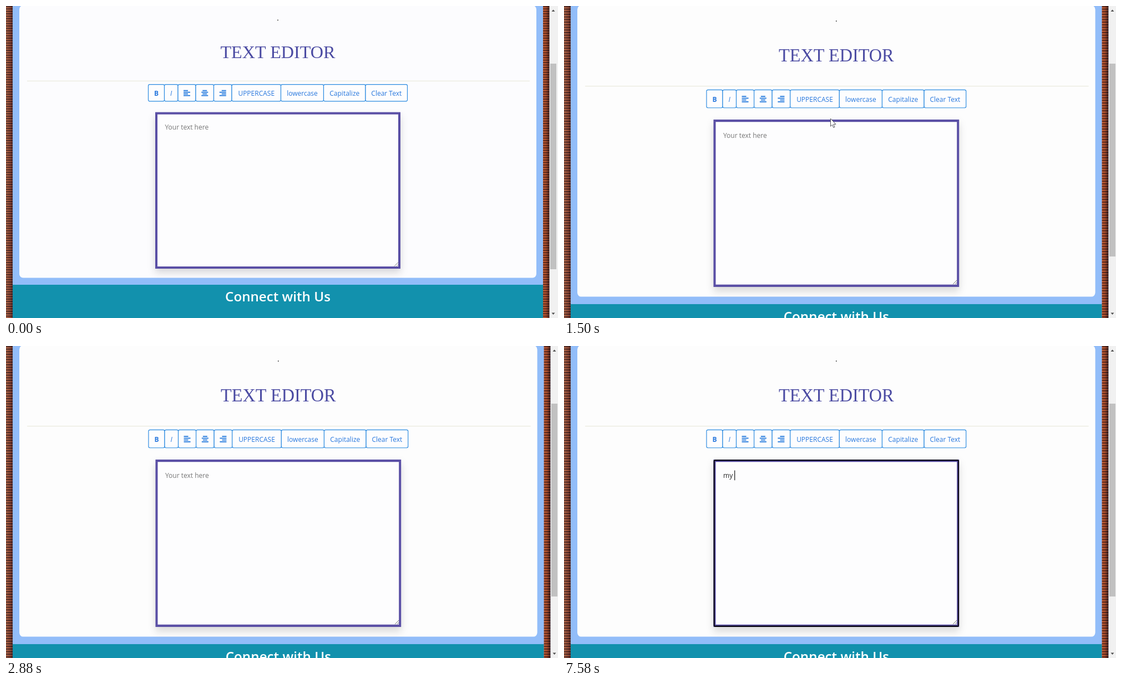
Animation of 995x563 px, one loop 8000 ms. Source, as an HTML page:

```html
<!DOCTYPE html>
<html lang="en">
<head>
<meta charset="utf-8">
<title>Text editor</title>
<style>
  html, body { margin: 0; width: 100%; height: 100%; overflow: hidden; background: #92bdf9; }
  svg { display: block; width: 995px; height: 563px; }
  text { font-family: "Open Sans", "Noto Sans", sans-serif; font-size: 12px; white-space: pre; }
  .btn { fill: #fdfdfe; stroke: #2a8ae0; stroke-width: 1.15; }
  .label { fill: #2878de; text-anchor: middle; }
  .icon { stroke: #1a74dc; stroke-width: 1.7; fill: none; }
</style>
</head>
<body>
<svg viewBox="0 0 995 563">
  <defs>
    <linearGradient id="left">
      <stop offset="0" stop-color="#a9654a"/><stop offset=".6" stop-color="#8c4634"/><stop offset="1" stop-color="#552a2a"/>
    </linearGradient>
    <linearGradient id="right">
      <stop offset="0" stop-color="#b9552e"/><stop offset=".45" stop-color="#a84a2b"/><stop offset="1" stop-color="#351616"/>
    </linearGradient>
    <pattern id="rows" width="12" height="4.4" patternUnits="userSpaceOnUse">
      <rect width="12" height="1.7" fill="#180c10" opacity=".6"/>
      <rect y="2.6" width="12" height=".8" fill="#dc8a58" opacity=".3"/>
    </pattern>
    <filter id="shadow" x="-10%" y="-10%" width="120%" height="125%">
      <feDropShadow dx="0" dy="7" stdDeviation="7" flood-color="#000" flood-opacity=".15"/>
    </filter>
  </defs>

  <g id="page">
    <rect width="980" height="563" fill="#92bdf9"/>
    <rect id="card" x="24" y="-1" width="932" height="491.5" rx="7"/>
    <rect x="12" y="503" width="956" height="60" fill="#1291ad"/>
    <g id="walls"></g>
    <circle cx="490" cy="25.5" r=".9" fill="#333"/>
    <text x="490" y="93.8" text-anchor="middle" fill="#4a4aa2" style="font:32.2px 'Liberation Serif',serif">TEXT EDITOR</text>
    <path d="M38 135.3H944" stroke="#eaeadd" stroke-width="1.2"/>
    <g id="bar"></g>
    <rect x="271" y="193.6" width="438" height="278.4" fill="#fdfdfe" stroke="#5a50a5" stroke-width="4" filter="url(#shadow)"/>
    <path d="M700 469.5L707 462.5M704 469.5L707 466.5" stroke="#666" stroke-width=".9"/>
    <g id="focus">
      <rect x="270.2" y="192.7" width="439.6" height="280.2" rx="2" fill="none" stroke="#0b0816" stroke-width="2.2"/>
      <path id="caret" d="M0 209.8V226.6" stroke="#000" stroke-width="1.1"/>
    </g>
    <text id="entry" x="286.5" y="223"></text>
    <text x="490" y="532.5" text-anchor="middle" fill="#fff" style="font-size:24.2px;font-weight:600">Connect with Us</text>
  </g>

  <g id="scroll">
    <rect width="16" height="563" fill="#f1f1f1"/>
    <rect id="thumb" x="1.5" y="104" width="11" fill="#c1c1c1"/>
    <path d="M4 10L7 6.5L10 10ZM4 553.5L7 557L10 553.5Z" fill="#505050"/>
  </g>

  <path id="cursor" d="M.5.5V14.5L3.6 11.6L5.8 16.7L8 15.8L5.8 10.7H10Z" fill="#fff" stroke="#55555c" stroke-width="1"/>
</svg>
<script>
const $ = id => document.getElementById(id);
const LOOP = 8000;
const placeholder = "Your text here";

// Side walls, repeated on both edges of the page
$("walls").innerHTML = [["left", 0], ["right", 968]].map(([name, x]) =>
  `<g transform="translate(${x})"><rect width="12" height="563" fill="url(#${name})"/>
   <rect width="12" height="563" fill="url(#rows)"/></g>`).join("");

// Toolbar
const edges = [256.5, 285.5, 310, 342, 374.5, 407, 495.5, 572.5, 648, 723.5];
const labels = ["B", "I", 0, .5, 1, "UPPERCASE", "lowercase", "Capitalize", "Clear Text"];

function alignIcon(cx, align) {
  const rows = [8, 12, 8, 12].map((w, i) =>
    `M${cx - 6 + (12 - w) * align} ${152.6 + i * 3}h${w}`);
  return `<path class="icon" d="${rows.join("")}"/>`;
}

$("bar").innerHTML = labels.map((label, i) => {
  const x = edges[i], w = edges[i + 1] - x, cx = x + w / 2;
  const style = label === "B" ? "font-weight:700" : label === "I" ? "font-style:italic" : "";
  const face = typeof label === "number" ? alignIcon(cx, label)
    : `<text class="label" x="${cx}" y="161.5" style="${style}">${label}</text>`;
  return `<g><rect class="btn" x="${x}" y="141.6" width="${w}" height="30.2" rx="2.5"/>${face}</g>`;
}).join("");

const [hoverRect, hoverText] = $("bar").children[6].children;

const clamp = v => Math.max(0, Math.min(1, v));
const mix = (a, b, k) => a.map((v, i) => Math.round(v + (b[i] - v) * k));
const show = (id, on) => $(id).setAttribute("visibility", on ? "visible" : "hidden");

function cursorAt(t) {
  if (t >= 1470 && t < 1600) {
    const k = (t - 1470) / 110;
    return [478 + 7 * k, 190 + 45 * k];
  }
  if (t >= 2490 && t < 2880) {
    const k = (t - 2490) / 390;
    return [502 + 67 * k, 197 - 34 * Math.sin(Math.PI * k)];
  }
  return null;
}

function draw(t) {
  const resized = t >= 600;
  $("page").setAttribute("transform", resized ? "scale(1.0017 1.0695)" : "");
  $("scroll").setAttribute("transform", `translate(${resized ? 981.5 : 979.5})`);
  $("thumb").setAttribute("height", resized ? 348 : 371);
  $("card").setAttribute("fill", t < 1470 ? "#fcfcfe" : "#fdfdfd");

  const spot = cursorAt(t);
  show("cursor", spot);
  if (spot) $("cursor").setAttribute("transform", `translate(${spot})`);

  const hover = Math.min(clamp((t - 2570) / 120), clamp((2870 - t) / 120));
  hoverRect.style.fill = `rgb(${mix([253, 253, 254], [2, 117, 216], hover)})`;
  hoverText.style.fill = `rgb(${mix([40, 120, 222], [255, 255, 255], hover)})`;

  const typed = [5980, 6960, 7580].filter(at => t >= at).length;
  $("entry").textContent = typed ? "my ".slice(0, typed) : placeholder;
  $("entry").setAttribute("fill", typed ? "#222" : "#777");
  show("focus", t >= 4180);
  $("caret").setAttribute("transform", `translate(${[287, 299, 305, 307.2][typed]})`);
}

const start = performance.now();
function tick() {
  draw((performance.now() - start) % LOOP);
  requestAnimationFrame(tick);
}
tick();
</script>
</body>
</html>
```
